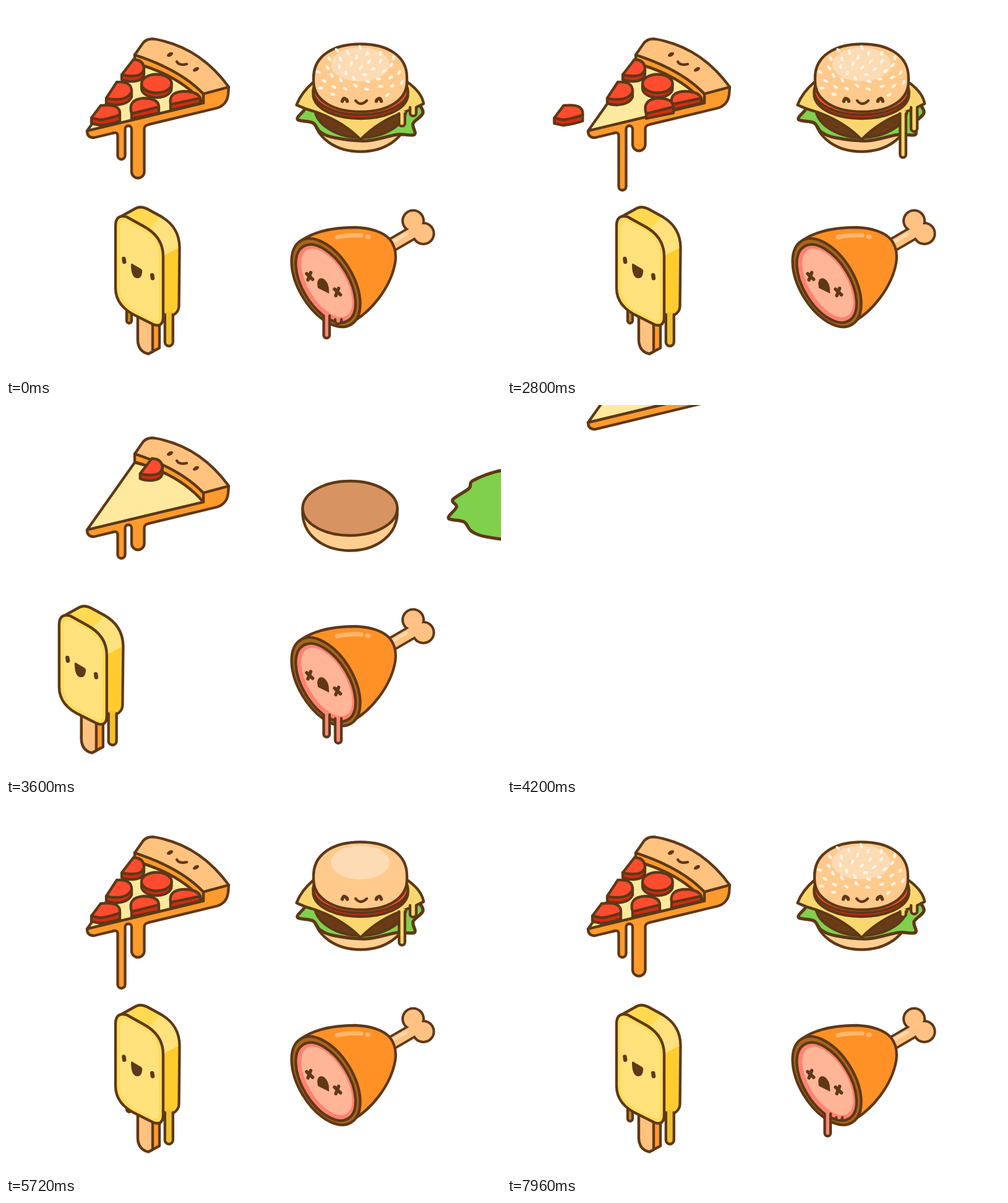
An HTML page for the animation above (8 s loop, 800 px wide and 600 px high).

```html
<!DOCTYPE html>
<html lang="en">
<head>
<meta charset="utf-8">
<title>Snacks</title>
<style>
html, body { margin: 0; width: 100%; height: 100%; overflow: hidden; background: #fff; }
svg { display: block; width: 800px; height: 600px; }
.ink { fill: none; stroke: #5e3817; stroke-width: 4.3; stroke-linejoin: round; stroke-linecap: round; }
.flat { stroke: none; }
.dark { fill: #5e3817; stroke: none; }
.crust { fill: #ffc27f; }
.side { fill: #ff9a2c; }
.top { fill: #ff4c2f; }
.rim { fill: #d42a12; }
.cheese { fill: #fad76e; }
</style>
</head>
<body>
<svg viewBox="0 0 800 600"><g class="ink">

<g id="pizza">
  <path fill="#fee99e" d="M208 93L131 202L319 157Q281 112 208 93Z"/>
  <path class="side" d="M131 202L319 157V142L360 131L359 143Q357 160 341 165L142 213Q131 213 131 202Z"/>
  <path class="side" d="M208 79Q282 103 319 142V157Q281 112 208 92Z"/>
  <path class="crust" d="M208 79L222 59Q229 52 240 53.5Q313 66 360 131L319 142Q282 103 208 79Z"/>
  <ellipse class="dark" cx="265" cy="78.5" rx="5.5" ry="3" transform="rotate(-28 265 78.5)"/>
  <ellipse class="dark" cx="307" cy="102.5" rx="5.5" ry="3" transform="rotate(-30 307 102.5)"/>
  <path d="M276 90Q280 97 292 94"/>
  <g id="pizzaDrips">
    <path class="flat" fill="#fff" d="M192.5 206V199A5.25 5.25 0 0 1 203 199V206Z"/>
    <path class="flat side" id="dripFill"/>
    <path id="dripLine"/>
  </g>
</g>

<g id="p6"><path class="rim" d="M187 111L223 101V110Q222 121 204 122Q194 122 187 119Z"/><path class="top" d="M206 86.5Q222 87 223 101Q221 113 206 113Q197 114 187 111Z"/></g>
<g id="p5"><path class="rim" d="M219 126V133A24 15 0 0 0 267.5 133V126Z"/><ellipse class="top" cx="243.3" cy="125.5" rx="24.3" ry="15"/></g>
<g id="p4"><path class="rim" d="M266 159L314 149V157L266 168Z"/><path class="top" d="M266 159Q262 138 290 138Q310 139 314 149Z"/></g>
<g id="p2"><path class="rim" d="M162 149L203 138V147Q198 159 178 160Q168 160 162 157Z"/><path class="top" d="M179 123Q203 121 203 138Q198 151 178 151Q168 151 162 149Z"/></g>
<g id="p3"><path class="rim" d="M203 174L247 163V173L203 182Z"/><path class="top" d="M203 174Q196 151 223 149Q247 150 247 163Z"/></g>
<g id="p1"><path class="rim" d="M138 181L153 184Q168 182 184 176V186Q170 191 152 193L138 190Z"/><path class="top" d="M153 161Q186 157 184 176Q168 182 153 184L138 181Z"/></g>

<g id="base">
  <path fill="#ffcf92" d="M496.5 167V178C500 215 535 235.5 573 235.5C611 235.5 646 215 649.5 178V167Z"/>
  <ellipse fill="#d79462" cx="573" cy="167" rx="76.5" ry="44"/>
</g>
<g id="lettuce"><path id="leaf" fill="#80d04c" stroke-width="5.2"/></g>
<g id="patty">
  <path fill="#6b3b17" d="M499 152V168C502 192 535 213 573 213C611 213 645 192 647 168V152A74 46 0 0 0 499 152Z"/>
  <g class="dark"><circle cx="611" cy="196" r="2"/><circle cx="627" cy="188" r="2"/><circle cx="532" cy="196" r="2"/></g>
</g>
<g id="cheese">
  <path class="cheese" d="M469.5 160Q477 140 497 123Q525 108 565 90Q571 87 577 90Q625 105 650 124Q672 140 675 158Q660 166 645 171Q602 186 573 216Q545 187 500 171Q484 167 469.5 160Z"/>
</g>
<g id="tomato">
  <path class="rim" d="M496.5 138V146C500 168 535 182 573 182C611 182 646 168 649.5 146V138Z"/>
  <ellipse class="top" cx="573" cy="138" rx="76.5" ry="38"/>
</g>
<g id="bun">
  <path fill="#ffca8b" d="M497 116C497 80 530 61.5 573 61.5C616 61.5 648 80 648 116V122C648 152 618 171 573 171C528 171 497 152 497 122Z"/>
  <ellipse class="flat" fill="#fddbb4" cx="572.5" cy="94.5" rx="47.5" ry="27.5"/>
  <path d="M565 153Q573 163 583 153"/>
  <path stroke-width="5.5" d="M543.5 154Q545 148 548 150Q551 151 551.500 154M598.5 154Q599 151 602 150Q605 148 606.500 154"/>
  <g id="seeds" class="flat" fill="#fff5e6"></g>
</g>

<g id="pop">
  <g id="popLeft"></g>
  <path class="side" d="M213 498V541Q214 559 230 562.5L248 553V500Z"/>
  <path class="crust" d="M213 498V541Q214 559 230 562.5L237 559V500Z"/>
  <path class="flat" fill="#ffcc2f" d="M183 342L210 327Q218 323 228 328L250 340Q280 357 280.5 390L279.5 486Q279 495 270 500L245 516Z"/>
  <path class="flat" fill="#ffda50" d="M183 342L210 327Q218 323 228 328L252 341L232 362Z"/>
  <path class="flat" fill="#ffe27e" d="M231 361L251 340Q280 356 280.5 390L254 404Q252 376 231 361Z"/>
  <path d="M183 342L210 327Q218 323 228 328L250 340Q280 357 280.5 390L279.5 486Q279 495 270 500L245 516"/>
  <g id="popRight"></g>
  <path fill="#ffdb5c" d="M177 356Q177 336 195 341L222 356Q254 373 254 405V502Q254 521 238 515L212 502Q177 486 177 456Z"/>
  <path class="flat" fill="#ffe27c" d="M184 357Q184 345 195 348L219 361Q247 376 247 405V502Q246 513 236 507L215 496Q184 481 184 456Z"/>
  <rect class="dark" x="187.5" y="405.5" width="6.5" height="11.5" rx="3" transform="rotate(-8 191 411)"/>
  <rect class="dark" x="233.3" y="432" width="6.5" height="11.5" rx="3" transform="rotate(-8 236.5 437.5)"/>
  <path class="dark" d="M202 418Q203 415 206 418L218 425Q221 427 220 431Q219 442 210 440Q202 437 202 418Z"/>
</g>

<g id="ham">
  <path stroke-width="24" stroke-linecap="butt" d="M614 392L662 364"/>
  <g class="dark"><circle cx="658" cy="347.5" r="19"/><circle cx="674.5" cy="368" r="19"/></g>
  <path stroke="#ffc283" stroke-width="16" d="M614 392L662 364"/>
  <g class="flat" fill="#ffc283"><circle cx="658" cy="347.5" r="15"/><circle cx="674.5" cy="368" r="15"/></g>
  <path stroke="#ffd9ac" stroke-width="5" d="M628 380L647 369"/>
  <path class="flat" fill="#ff9126" d="M476 380C500 363 535 358 565 358C590 359 610 366 620 377C629 388 631 402 629 415C622 455 590 495 558 512L541 518Z"/>
  <path d="M476 380C500 363 535 358 565 358C590 359 610 366 620 377C629 388 631 402 629 415C622 455 590 495 558 512Q549 517 541 518"/>
  <path stroke="#ffb66c" stroke-width="7" d="M535 374Q553 370 574 371M584 373L586 373.5"/>
  <g transform="translate(517 447.5) rotate(59)">
    <ellipse fill="#a9651c" rx="79" ry="44"/>
    <ellipse fill="#ff8270" cx="1" cy="1" rx="70" ry="37.5"/>
    <ellipse class="flat" fill="#ffb596" cx="1" cy="-1" rx="62" ry="30.5"/>
  </g>
  <path stroke-width="5.5" d="M486 433L495.500 442M488 443L492.500 431M531 458L540.500 467M533 468.500L537.500 456.500"/>
  <path class="dark" d="M503 449Q504 438 513 441Q523 447 522 465L504 456Z"/>
  <g id="hamDrips"></g>
  <g id="chunk">
    <path class="flat" fill="#ff9126" d="M558 513.5C540 522 525 524 510 523C470 523 437 490 437 450C437 425 450 396 486 378L476 380A79 44 59 0 1 558 514Z"/>
    <path stroke="#e68222" d="M490 379C540 384 579 455 571 502"/>
    <path d="M558 513C540 522 525 524 510 523C470 523 437 490 437 450C437 425 450 396 486 376"/>
  </g>
</g>

</g></svg>
<script>
const LOOP = 8000, STEP = 40, FAR = 1000, HEIGHT = 800;
const LEAVE = 400, LAND = 320, RAMP = 350, FALL = 360;
const $ = id => document.getElementById(id);
const clamp = v => Math.max(0, Math.min(1, v));
const smooth = v => v * v * (3 - 2 * v);
const easeIn = v => v ** 3;
// Runs 1 to 0 with a slight overshoot.
const landing = v => -(1.7 * (v - 1) ** 3 + 0.7 * (v - 1) ** 2);

function add(parent, tag, attrs = {}) {
  const el = document.createElementNS('http://www.w3.org/2000/svg', tag);
  for (const k in attrs) el.setAttribute(k, attrs[k]);
  return parent.appendChild(el);
}
function move(el, x, y, turn = 0) {
  el.setAttribute('transform', `translate(${x} ${y}) rotate(${turn})`);
}
function show(el, on) { el.style.display = on ? '' : 'none'; }

// Closed smooth curve through points.
function blob(p) {
  const pt = i => p[(i + p.length) % p.length];
  return p.reduce((d, b, i) => {
    const a = pt(i - 1), c = pt(i + 1), e = pt(i + 2);
    const out = b.map((v, k) => v + (c[k] - a[k]) / 6);
    const into = c.map((v, k) => v - (e[k] - b[k]) / 6);
    return d + `C${out} ${into} ${c}`;
  }, 'M' + p[0]) + 'Z';
}
$('leaf').setAttribute('d', blob([
  [471, 183], [484, 165], [478, 153], [504, 135], [511, 122], [556, 106], [604, 107], [640, 126], [660, 150],
  [674, 172], [658, 190], [660, 208], [632, 208], [583, 218], [531, 213], [508, 204], [496, 189]]));

// Seeds spread in a sunflower spiral, leaving the face free.
const seeds = Array.from({ length: 44 }, (_, i) => {
  const r = Math.sqrt((i + 0.5) / 44), a = i * 2.4;
  return {
    x: 572 + 72 * r * Math.cos(a), y: 111 + 48 * r * Math.sin(a),
    turn: i * 67, start: 5740 + (i * 13 % 44) * 28
  };
}).filter(s => s.y < 137 || Math.abs(s.x - 573) > 42);
for (const s of seeds) s.el = add($('seeds'), 'ellipse', { rx: 4.2, ry: 2.3 });

// Each part slides off sideways, then comes back vertically.
const parts = [
  { id: 'pizza', out: 3590, dx: -FAR, back: 4099, dy: -HEIGHT },
  { id: 'pop', out: 3420, dx: -FAR, back: 4200, dy: HEIGHT },
  { id: 'ham', out: 3600, dx: FAR, back: 4280, dy: HEIGHT }
];
// Stacked parts leave to alternating sides and return in reverse order.
function stack(ids, out, back, gap) {
  ids.forEach((id, i) => parts.push({
    id, out: out(i), dx: i % 2 ? -FAR : FAR,
    back: back + gap * (ids.length - 1 - i), dy: -HEIGHT
  }));
}
stack(['bun', 'tomato', 'cheese', 'patty', 'lettuce', 'base'], i => 2762 + 147 * i, 4173, 145);
stack(['p1', 'p3', 'p2', 'p4', 'p5', 'p6'], i => 2642 + 834 * (i / 5) ** 1.8, 4300, 220);
for (const p of parts) if (/^p\d/.test(p.id)) p.dx *= -1;

// 0 to 1: how far a drip is drawn out, given its long spells.
function stretch(spells, t) {
  return Math.max(...spells.map(([from, to]) => Math.max(...[t, t + LOOP].map(u =>
    smooth(clamp((u - from) / RAMP)) * (1 - smooth(clamp((u - to) / RAMP)))))));
}

function drip(host, x, w, y, fill, short, long, ...spells) {
  const g = add($(host), 'g');
  return { g, x, w, y, short, long, spells, body: add(g, 'path', { class: 'flat', fill }), line: add(g, 'path') };
}
const drips = [
  drip('cheese', 640, 9.5, 174, '#fad76e', 170, 247, [7862, 8900], [2300, 3400], [5475, 6600]),
  drip('cheese', 658, 10, 164, '#fad76e', 180, 205, [1500, 3300], [5620, 6600]),
  drip('popRight', 263.3, 13, 499, '#efc12d', 490, 552, [5000, 11900]),
  drip('popLeft', 199, 8, 488, '#c58c22', 485, 515, [5545, 11000]),
  drip('hamDrips', 518.2, 9.5, 501, '#ff8a7a', 500, 539, [7200, 8700], [3100, 3700], [5900, 6400]),
  drip('hamDrips', 537, 10, 507, '#ff8a7a', 505, 549, [7886, 9000], [3100, 3700], [6000, 6500])
];

// The ham lets a drop go whenever a drip draws back.
const drops = drips.slice(-2).flatMap(d => d.spells.map(s => ({
  x: d.x, y: d.long - 6, start: s[1] % LOOP,
  el: add($('hamDrips'), 'ellipse', { rx: 4.5, ry: 6, fill: '#ff8a7a' })
})));

const tip = (d, t) => d.short + (d.long - d.short) * stretch(d.spells, t);
const thin = { short: 250, long: 300, spells: [[300, 1300], [2300, 3200], [4586, 6200]] };
const thick = { short: 236, long: 280, spells: [[7500, 8300], [1400, 2200], [5590, 6600]] };

function drawDrip(d, t) {
  const end = tip(d, t), r = d.w / 2, l = d.x - r;
  show(d.g, end > d.y + 3);
  const low = Math.max(d.y, end - 2 - r);
  const path = `M${l} ${d.y}V${low}A${r} ${r} 0 0 0 ${l + d.w} ${low}V${d.y}`;
  d.line.setAttribute('d', path);
  d.body.setAttribute('d', path + `V${d.y - 4}H${l}Z`);
}

function drawPizzaDrips(t) {
  // After landing the drips grow out of the edge.
  const grown = t < 3900 ? 1 : smooth(clamp((t - 4400) / RAMP));
  const a = 209 + (tip(thin, t) - 217) * grown, b = 203 + (tip(thick, t) - 215) * grown;
  const d = `M172 205.5Q180.5 203 180.5 210V${a}A6 6 0 0 0 192.5 ${a}V199A5.25 5.25 0 0 1 203 199V${b}A10.25 10.25 0 0 0 223.5 ${b}V198Q224 193 231 191.5`;
  $('dripLine').setAttribute('d', d);
  $('dripFill').setAttribute('d', d + 'L229 187L198 193L176 200Z');
  show($('pizzaDrips'), grown > 0);
}

function draw(t) {
  for (const p of parts) {
    const el = $(p.id), gone = (t - p.out) / LEAVE;
    if (t < p.back) move(el, p.dx * easeIn(clamp(gone)), 0);
    else move(el, 0, p.dy * landing(clamp((t - p.back) / LAND)));
    show(el, gone < 1 || t >= p.back);
  }

  const fall = easeIn(clamp((t - 5060) / 420));
  show($('chunk'), t > 4000 && fall < 1);
  move($('chunk'), -60 * fall, 260 * fall);

  for (const s of seeds) {
    const up = t < 4000 ? 0 : 1 - clamp((t - s.start) / 300);
    move(s.el, s.x, s.y - (s.y + 20) * up, s.turn);
  }

  for (const d of drips) drawDrip(d, t);
  drawPizzaDrips(t);
  for (const d of drops) {
    const u = (t - d.start) / FALL;
    show(d.el, u >= 0 && u < 1);
    move(d.el, d.x, d.y + 80 * u * u);
  }
}

const begin = performance.now();
function tick() {
  const now = performance.now() - begin + 6;
  draw(Math.floor(now / STEP) * STEP % LOOP);
  requestAnimationFrame(tick);
}
tick();
</script>
</body>
</html>
```
